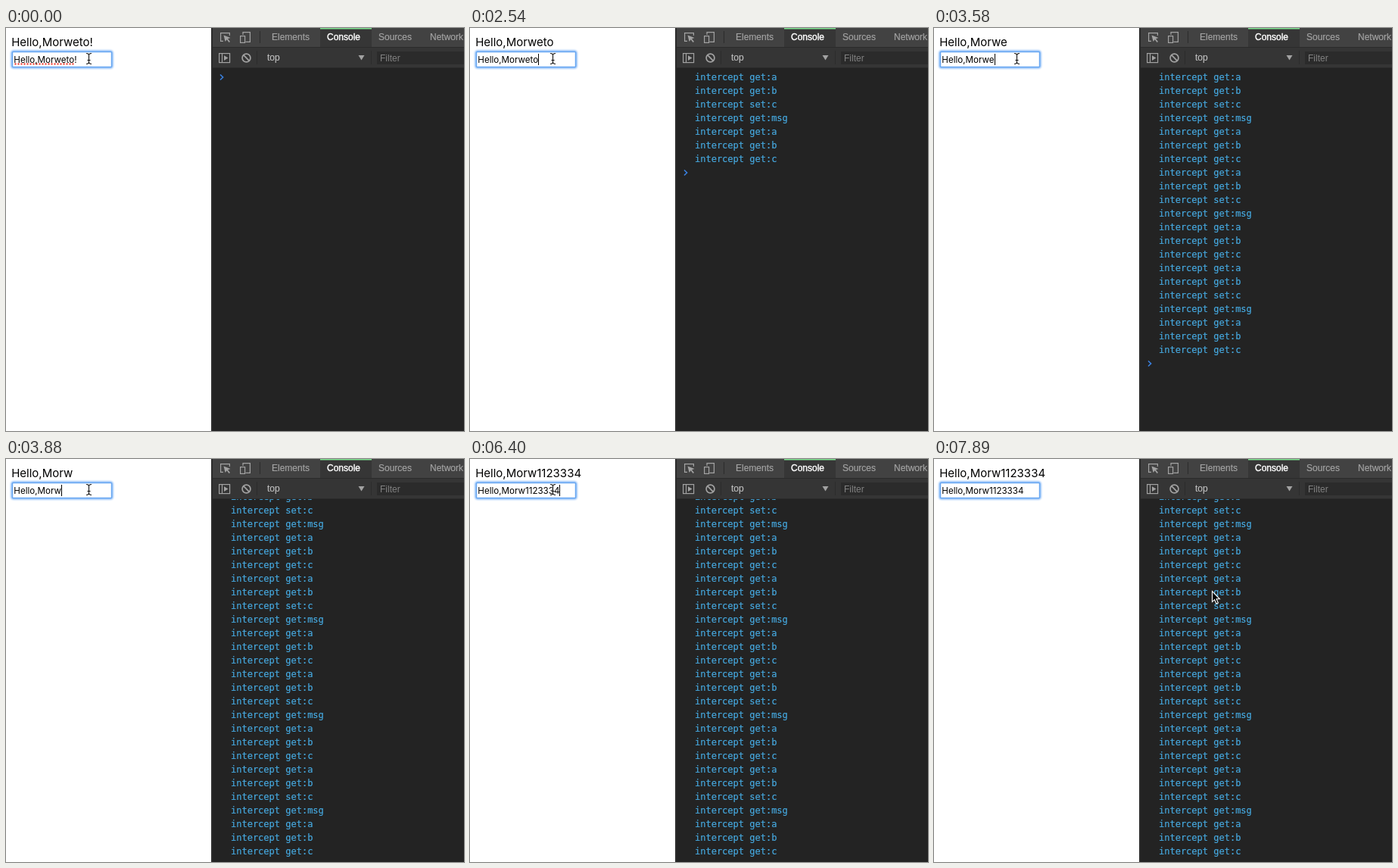
Write an HTML page that moves like this. It is 605x532 px and loops after 8 s.

```html
<!DOCTYPE html>
<html lang="en">
<head>
<meta charset="utf-8">
<title>Two-way binding with console log</title>
<style>
  html, body { margin: 0; width: 605px; height: 532px; overflow: hidden; background: #fff; }
  svg { display: block; }
  text { white-space: pre; }
  .page { font-family: Inter, "Open Sans", sans-serif; fill: #000; }
  .ui { font: 12px "Liberation Sans", Arial, sans-serif; fill: #a2a2a2; stroke: #a2a2a2; stroke-width: .2; }
  .ui .on { fill: #fff; stroke: #fff; stroke-width: .4; }
  .log { font: 12px "DejaVu Sans Mono", monospace; fill: #46a9e0; stroke: #46a9e0; stroke-width: .2; }
  .icon { fill: none; stroke: #a2a2a2; stroke-width: 1.2; }
</style>
</head>
<body>
<svg width="605" height="532" viewBox="0 0 605 532">
  <defs>
    <filter id="glow" x="-10%" y="-40%" width="120%" height="180%"><feGaussianBlur stdDeviation=".8"/></filter>
    <pattern id="dots" x="11" y="46" width="4" height="3" patternUnits="userSpaceOnUse">
      <circle cx="1.5" cy="1.5" r="1.2" fill="#f0483e"/>
    </pattern>
  </defs>

  <!-- page -->
  <rect width="272" height="532" fill="#fff"/>
  <text id="title" class="page" x="7.2" y="24" font-size="15"></text>
  <rect x="8" y="31" width="132" height="21" rx="2" fill="none" stroke="#7db4f7" stroke-width="3" filter="url(#glow)"/>
  <rect x="8.5" y="31.5" width="131" height="20" rx="1" fill="#fff" stroke="#69a7f1" stroke-width="1.5"/>
  <rect id="spell" x="11" y="46" height="3" fill="url(#dots)"/>
  <text id="field" class="page" x="10.3" y="46" font-size="11.6"></text>
  <rect id="caret" y="34" width="1" height="15" fill="#000"/>

  <!-- console -->
  <rect x="273" y="53" width="332" height="479" fill="#232323"/>
  <g id="logs" class="log"></g>
  <path id="prompt" d="M283 61.5l3.6 3.5l-3.6 3.5" fill="none" stroke="#3a80e0" stroke-width="1.6"/>

  <!-- toolbars -->
  <rect x="273" width="332" height="26" fill="#424242"/>
  <rect x="273" y="26" width="332" height="27" fill="#353535"/>
  <path d="M273 25.5H605M273 52.5H605" stroke="#2b2b2b"/>
  <rect x="415" width="68" height="25" fill="#363636"/>
  <rect x="415" width="68" height="1.5" fill="#7fe08f"/>
  <rect x="490" y="31" width="115" height="17" fill="#2b2b2b"/>
  <path d="M335.5 4V20M331.5 30V48M482.5 30V48" stroke="#2c2c2c"/>
  <rect x="271" width="2" height="532" fill="#2c2c2c"/>
  <g class="icon">
    <path d="M287 17.4H283.6V6.6H295.4V10"/>
    <path d="M287.5 9.5L296.5 13L293 14.2L296 18L294.6 19L291.7 15.3L289.6 18Z" fill="#a2a2a2" stroke="none"/>
    <path d="M313 9V5.6H322.4V18.4H316.5"/>
    <rect x="309.6" y="10.6" width="6" height="8.8"/>
    <rect x="281.6" y="33.6" width="14" height="12"/>
    <path d="M285.5 33.6V45.6"/>
    <path d="M288 36.2L293.5 39.6L288 43Z" fill="#a2a2a2" stroke="none"/>
    <circle cx="317.5" cy="39.5" r="5.4" stroke-width="1.7"/>
    <path d="M313.7 35.7L321.3 43.3" stroke-width="1.7"/>
    <path d="M465.5 36H473.5L469.5 42.5Z" fill="#a2a2a2" stroke="none"/>
  </g>
  <g class="ui">
    <text x="351" y="16">Elements</text>
    <text x="424" y="16" class="on">Console</text>
    <text x="492" y="16">Sources</text>
    <text x="560" y="16">Network</text>
    <text x="345" y="43" style="fill:#c4c4c4">top</text>
    <text x="494" y="44" style="fill:#828282;stroke:none">Filter</text>
  </g>

  <!-- pointers -->
  <g id="beam" fill="none">
    <path d="M106 33.5Q109.5 33.5 109.5 36V45Q109.5 47.5 106 47.5M113 33.5Q109.5 33.5 109.5 36M109.5 45Q109.5 47.5 113 47.5M107.5 42.5H111.5" stroke="#fff" stroke-opacity=".7" stroke-width="2.4"/>
    <path d="M106 33.5Q109.5 33.5 109.5 36V45Q109.5 47.5 106 47.5M113 33.5Q109.5 33.5 109.5 36M109.5 45Q109.5 47.5 113 47.5M107.5 42.5H111.5" stroke="#111" stroke-width="1.1"/>
  </g>
  <path id="arrow" d="M.5 .7V14.6L3.6 11.7L6 17L8.4 16L6.1 10.8H10.4Z" fill="#000" stroke="#fff" stroke-width="1.1"/>
</svg>

<script>
const $ = id => document.getElementById(id);
const LOOP = 8000, ROW = 18, FULL = 28, SCROLL = 33;
const WORD = 'Hello,Morweto', STEM = 'Hello,Morw';
const BATCH = ['get:a', 'get:b', 'set:c', 'get:msg', 'get:a', 'get:b', 'get:c'];

// [start, text, caret visible, logged lines]
const edits = [
  [0, WORD + '!', 0, 0],
  [600, WORD + '!', 1, 0],
  [1040, WORD + '!', 0, 0],
  [1490, WORD + '!', 1, 0],
  [1940, WORD, 1, 0],
  [2090, WORD, 0, 7],
  [2540, WORD, 1, 7],
  [2690, WORD.slice(0, -1), 1, 14],
  [2990, WORD.slice(0, -1), 0, 14],
  [3290, WORD.slice(0, -2), 0, 21],
  [3580, WORD.slice(0, -2), 1, 21],
  [3880, STEM, 1, FULL],
  [4020, STEM, 0, FULL],
  [4470, STEM, 1, FULL],
  [5070, STEM + '1', 1, FULL],
  [5510, STEM + '112', 1, FULL],
  [5660, STEM + '1123', 1, FULL],
  [5960, STEM + '11233', 1, FULL],
  [6250, STEM + '112333', 1, FULL],
  [6400, STEM + '1123334', 1, FULL],
  [7000, STEM + '1123334', 0, FULL],
  [7440, STEM + '1123334', 1, FULL],
  [7890, STEM + '1123334', 0, FULL]
];

// [start, x, y] of the arrow tip; before the first one the text beam is shown
const moves = [
  [7000, 150, 66],
  [7150, 235, 112],
  [7290, 318, 151],
  [7440, 357, 169],
  [7740, 367, 174]
];

const rows = Array.from({ length: FULL }, (_, i) => {
  const row = document.createElementNS('http://www.w3.org/2000/svg', 'text');
  row.setAttribute('x', 297);
  row.setAttribute('y', 69 + i * ROW);
  row.textContent = 'intercept ' + BATCH[i % BATCH.length];
  return $('logs').appendChild(row);
});

const at = (steps, t) => steps.filter(s => s[0] <= t).pop();
const show = (el, on) => el.setAttribute('visibility', on ? 'visible' : 'hidden');
const shift = (el, x, y) => el.setAttribute('transform', `translate(${x} ${y})`);

function draw(t) {
  const [, text, caret, lines] = at(edits, t);
  const scroll = lines === FULL ? -SCROLL : 0;
  $('title').textContent = $('field').textContent = text;

  $('caret').setAttribute('x', Math.round(10.3 + $('field').getComputedTextLength()));
  show($('caret'), caret);

  const marked = t < 2090;
  show($('spell'), marked);
  if (marked) $('spell').setAttribute('width', $('field').getSubStringLength(0, WORD.length) - 1);

  rows.forEach((row, i) => show(row, i < lines));
  shift($('logs'), 0, scroll);
  shift($('prompt'), 0, lines * ROW + scroll);

  const tip = at(moves, t);
  show($('beam'), !tip);
  show($('arrow'), tip);
  if (tip) shift($('arrow'), tip[1], tip[2]);
}

function tick() {
  draw(performance.now() % LOOP);
  requestAnimationFrame(tick);
}
tick();
</script>
</body>
</html>
```
